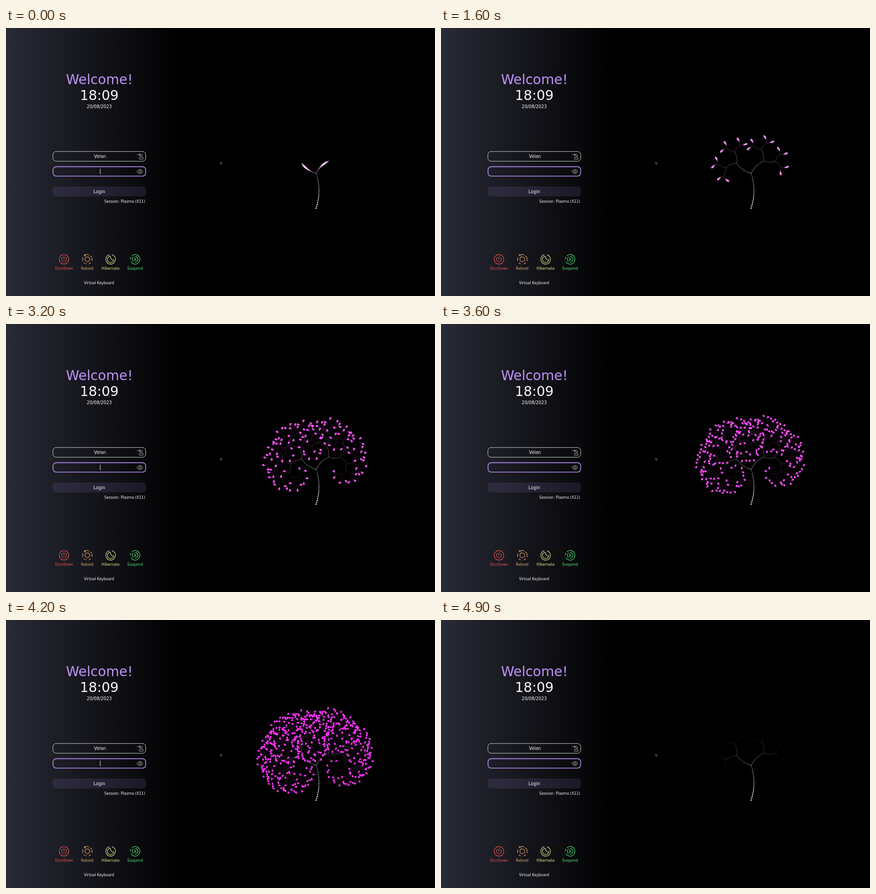
An HTML page with a canvas for the animation above (5000 ms loop, 947x592 px).

```html
<!DOCTYPE html>
<html lang="en">
<head>
<meta charset="utf-8">
<title>Login screen</title>
<style>
  html, body { margin: 0; width: 100%; height: 100%; overflow: hidden; background: #000; }
  svg, canvas { position: absolute; left: 0; top: 0; width: 947px; height: 592px; }
  text { font-family: "DejaVu Sans", Verdana, sans-serif; fill: #f8f8f2; text-anchor: middle; }
  .big { font-size: 29.6px; }
  .mid { font-size: 9.6px; }
  .small { font-size: 8.1px; }
  .icon { fill: none; stroke-width: 1.2; stroke-linecap: round; stroke-linejoin: round; }
  .caret { animation: blink 1s step-end infinite; }
  @keyframes blink { 50% { opacity: 0; } }
</style>
</head>
<body>
<svg viewBox="0 0 947 592">
  <defs>
    <linearGradient id="shade">
      <stop offset="0" stop-color="#282a36"/>
      <stop offset="1" stop-color="#000"/>
    </linearGradient>
  </defs>
  <rect width="947" height="592" fill="#000"/>
  <rect width="387" height="592" fill="url(#shade)"/>

  <text class="big" x="206.2" y="123.5" style="fill:#bd93f9">Welcome!</text>
  <text class="big" x="206" y="159.2">18:09</text>
  <text class="mid" x="206" y="176.5">20/08/2023</text>

  <rect x="103.5" y="272.8" width="205" height="21.5" rx="7" fill="none" stroke="#d8d8d4"/>
  <text class="mid" x="207.5" y="286.8">Velan</text>
  <g class="icon" stroke="#c4c4c0" style="stroke-width:.9">
    <path d="M289.5 279.5H296.5M294 277L296.5 279.5L294 282"/>
    <circle cx="298.5" cy="281.3" r="2.4"/>
    <path d="M294.3 289.5V288Q294.3 285.4 297 285.4H300Q302.7 285.4 302.7 288V289.5Z"/>
  </g>

  <rect x="103.8" y="306.4" width="204.6" height="20.8" rx="7" fill="none" stroke="#bd93f9" stroke-width="1.6"/>
  <rect class="caret" x="207.5" y="310.5" width="1" height="12.5" fill="#f0f0ea"/>
  <g class="icon" stroke="#c4c4c0" style="stroke-width:.9">
    <path d="M289.2 317Q295.7 307.6 302.2 317Q295.7 326.4 289.2 317Z"/>
    <circle cx="295.7" cy="317" r="2.5"/>
  </g>

  <rect x="103" y="350" width="206" height="22" rx="7" fill="#bd93f9" fill-opacity=".115"/>
  <text class="mid" x="206" y="364.6">Login</text>
  <text class="small" x="307.2" y="385.6" style="text-anchor:end">Session: Plasma (X11)</text>

  <g class="icon" stroke="#e65050">
    <circle cx="128" cy="511" r="10.6"/>
    <path d="M128 504.5V511.5M124.7 506.6A5.5 5.5 0 1 0 131.3 506.6"/>
  </g>
  <text class="small" x="128" y="534.4" style="fill:#e65050">Shutdown</text>

  <g class="icon" stroke="#e0a468">
    <circle cx="179.5" cy="511" r="5.4"/>
    <path d="M173 502.6A10.6 10.6 0 0 1 183.5 501.2M187 503.5A10.6 10.6 0 0 1 189.6 514.2M187 518.5A10.6 10.6 0 0 1 183 521M176 521A10.6 10.6 0 0 1 172 518.5M169.4 514.2A10.6 10.6 0 0 1 169.8 506.8"/>
    <path d="M173.5 499.8L172.8 502.8L176 504"/>
  </g>
  <text class="small" x="179.5" y="534.4" style="fill:#e0a468">Reboot</text>

  <g class="icon" stroke="#dfe686">
    <path d="M234 500.8A10.6 10.6 0 1 1 228 500.8"/>
    <path d="M230.3 504.2A7 7 0 1 0 237.8 512.2A7.6 7.6 0 0 1 230.3 504.2Z"/>
  </g>
  <text class="small" x="231" y="534.4" style="fill:#dfe686">Hibernate</text>

  <g class="icon" stroke="#52e474">
    <path d="M278 503A10.6 10.6 0 1 1 276 516.6M274.4 511A10.6 10.6 0 0 1 275.6 506.2"/>
    <path d="M285 504.8A6.2 6.2 0 0 1 285 517.2M281.5 516.1A6.2 6.2 0 0 1 281.5 505.9M283.8 508.6V513.4M286.3 508.6V513.4"/>
  </g>
  <text class="small" x="285" y="534.4" style="fill:#52e474">Suspend</text>

  <text class="small" x="205.5" y="566" style="font-size:8px">Virtual Keyboard</text>

  <path d="M473.8 295.6V300.6L475 299.6L475.9 301.2L476.6 300.8L475.8 299.2L477.2 299Z" fill="#111" stroke="#a8a8a8" stroke-width=".6"/>
</svg>
<canvas id="tree" width="947" height="592"></canvas>

<script>
const ctx = document.getElementById('tree').getContext('2d');
const LOOP = 5000, STEP = 100, LEVEL_MS = 510, STOP = 4400;
const LEVELS = 10, TRUNK = 77, TRAIL = 0.86, LEAF = 2.2, BEND = 0.083;
const rad = d => d * Math.PI / 180;
const TURNS = [rad(-55.5), rad(45.5)];
const segs = [];

// Every level takes the same time; length shrinks as 1 / (level + 1).
function grow(x, y, angle, level) {
  const len = TRUNK / (level + 1), side = level % 2 ? -1 : 1;
  const dx = Math.sin(angle), dy = -Math.cos(angle);
  const at = v => {
    const along = v * len, off = 4 * BEND * len * v * (1 - v) * side;
    return [x + dx * along - dy * off, y + dy * along + dx * off];
  };
  segs.push({ level, at });
  if (level < LEVELS) {
    const [ex, ey] = at(1);
    TURNS.forEach(turn => grow(ex, ey, angle + turn, level + 1));
  }
}
grow(684.5, 398, 0, 0);

const tint = level => `rgb(255,${215 - 17 * level},255)`;

function dots(seg, end) {
  const n = 19;
  for (let i = 0; i <= n * end; i++) {
    const v = i / n, [x, y] = seg.at(v);
    ctx.beginPath();
    ctx.arc(x, y, seg.level ? 0.7 - 0.1 * v : 1.45 - 0.7 * v, 0, 7);
    ctx.fill();
  }
}

function line(seg, end) {
  ctx.beginPath();
  for (let i = 0; i <= 6; i++) ctx.lineTo(...seg.at(end * i / 6));
  ctx.stroke();
}

// The part of the moving leaf that lies on this segment: a slim tail, widest near the head.
function leaf(seg, tail, head) {
  const a = Math.max(0, tail - seg.level), b = Math.min(1, head - seg.level);
  if (b <= a) return;
  const span = head - tail, left = [], right = [], n = 8;
  for (let i = 0; i <= n; i++) {
    const v = a + (b - a) * i / n;
    const u = Math.min(1, Math.max(0, (seg.level + v - tail) / span));
    const w = LEAF * Math.min(1, span / TRAIL) * Math.sin(Math.PI * u ** 1.7);
    const [x, y] = seg.at(v), [x1, y1] = seg.at(v + 0.01), [x0, y0] = seg.at(v - 0.01);
    const d = Math.hypot(x1 - x0, y1 - y0);
    const nx = (y0 - y1) / d * w, ny = (x1 - x0) / d * w;
    left.push([x + nx, y + ny]);
    right.unshift([x - nx, y - ny]);
  }
  ctx.beginPath();
  left.concat(right).forEach(p => ctx.lineTo(...p));
  ctx.fill();
}

function draw(t) {
  const headAt = ms => 2.02 + ms / LEVEL_MS;
  const head = headAt(Math.min(t, STOP)), tail = headAt(t) - TRAIL;
  const fade = Math.max(0, (t - 4300) / 600);
  ctx.clearRect(0, 0, 947, 592);
  ctx.lineWidth = 0.9;
  for (const seg of segs) {
    const k = seg.level, end = Math.min(1, head - k);
    if (end <= 0) continue;
    const base = k === 0 ? 0.95 : k === 1 ? 0.75 : 0.8 / k ** 0.85;
    ctx.globalAlpha = base * Math.max(0, 1 - fade * k * 0.2);
    ctx.fillStyle = k < 2 ? '#f8f0ff' : tint(k);
    ctx.strokeStyle = tint(k);
    if (k < 2) dots(seg, end); else line(seg, end);
  }
  ctx.globalAlpha = 1;
  if (tail >= head) return;
  for (const seg of segs) {
    ctx.fillStyle = tint(seg.level);
    leaf(seg, tail, head);
  }
}

let start, shown = -1;
function tick(now) {
  start ??= now;
  const t = Math.floor((now - start) % LOOP / STEP) * STEP;
  if (t !== shown) draw(shown = t);
  requestAnimationFrame(tick);
}
draw(0);
requestAnimationFrame(tick);
</script>
</body>
</html>
```
